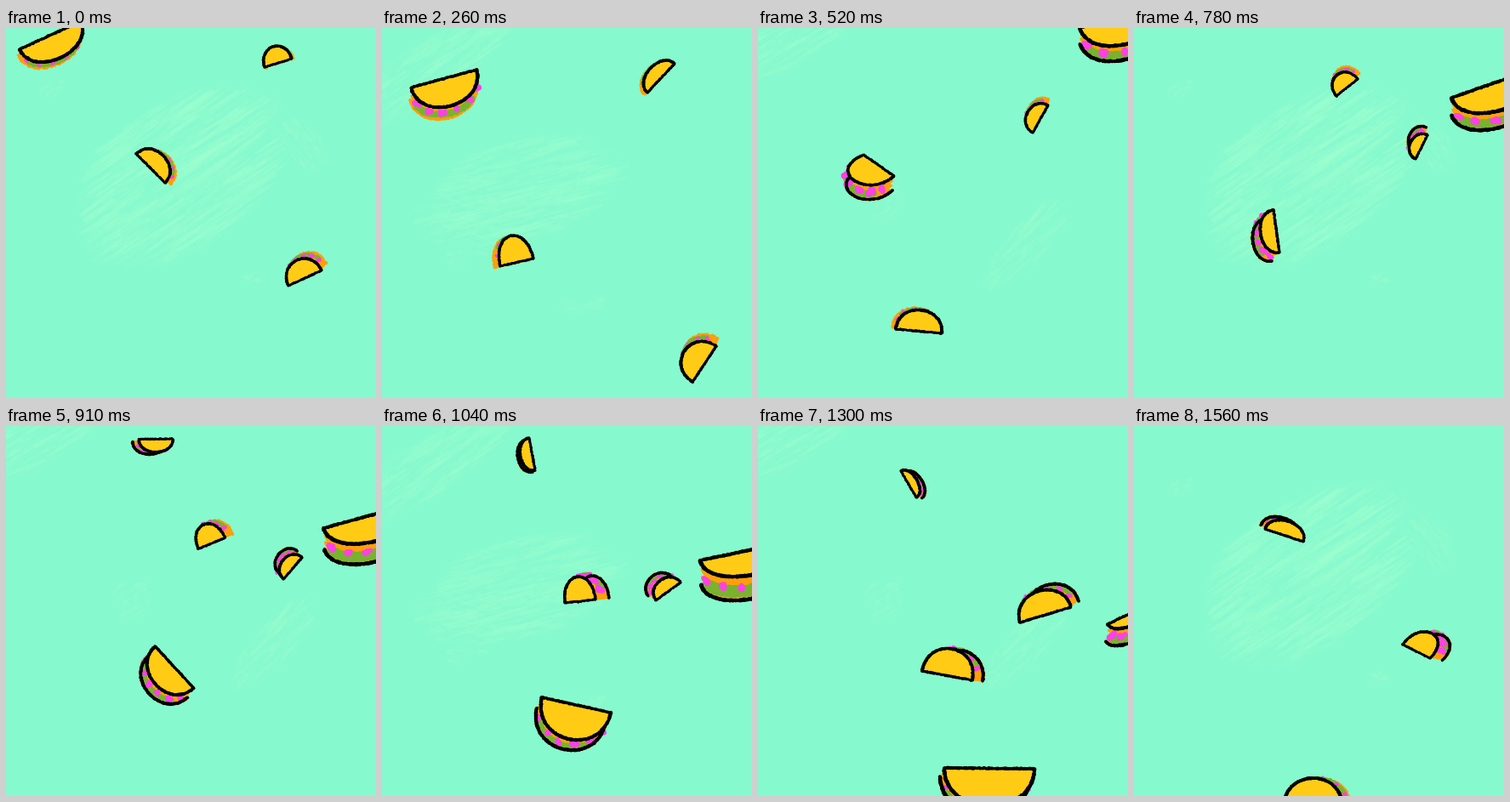
Animation, 435 px wide and 435 px high, one loop 1690 ms. Source, as an HTML page with a canvas:

```html
<!DOCTYPE html>
<html lang="en">
<head>
<meta charset="utf-8">
<title>Falling tacos</title>
<style>
  html, body { margin: 0; width: 100%; height: 100%; overflow: hidden; background: #86f9ce; }
  canvas { display: block; width: 435px; height: 435px; }
</style>
</head>
<body>
<canvas id="stage" width="435" height="435"></canvas>
<script>
const ctx = document.getElementById('stage').getContext('2d');
const SIZE = 435, STEP = 130, STEPS = 13;
const COLOR = { shell: '#ffcb14', back: '#ff9f0a', salad: '#79b330', salsa: '#ff40e6', ink: '#000' };

// A pose every second step: tip P (x, y), tip Q (x, y), bulge, back shell offset (x, y), lean.
// The bulge lies to the left when walking from P to Q.
const tumbler = [
  [304, 46, 336, 36, 20, 2, 1],
  [312, 76, 344, 42, 17, -3, 2],
  [323, 123, 341, 91, 17, 2, -6],
  [331, 154, 345, 126, 14, -1, -9],
  [322, 205, 351, 184, 16, -9, -5],
  [308, 231, 368, 213, 29, 9, -7],
  [316, 257, 348, 273, 27, 14, 3, .35]
];
const tumblerEnd = [
  [332, 303, 371, 285, 23, 6, -7],
  [365, 416, 393, 374, 28, 3, -8]
];
const drifter = [
  [180, 52, 173, 14, 14, -3, 2],
  [168, 53, 186, 84, 11, 6, 1],
  [154, 121, 199, 136, 17, -5, -4]
];
const drifterEnd = [
  [153, 148, 187, 182, 21, 6, 2],
  [139, 280, 178, 271, 32, -6, 3],
  [162, 354, 216, 359, 25, -4, -2]
];
const diver = [
  [88, -8, 16, 25, 29, -2, 7],
  [111, 49, 34, 70, 33, -1, 14],
  [160, 174, 124, 149, 31, -2, 17, .6],
  [171, 264, 164, 214, 19, -9, 10],
  [269, 337, 188, 319, 41, -6, 12],
  [325, 403, 219, 402, 44, -5, 9]
];
const giant = [
  [480, -35, 378, 0, 36, 0, 18],
  [480, 45, 373, 82, 33, 0, 20],
  [490, 134, 374, 158, 29, 1, 28],
  [480, 200, 411, 233, 15, -2, 20]
];
const grower = [
  [238, 80, 263, 60, 19, 2, -6],
  [215, 208, 251, 204, 29, 16, -1],
  [193, 288, 252, 299, 32, 12, 2],
  [176, 448, 245, 448, 34, 10, 1]
];

// base: step of the first pose; from..to: visible steps; ink: steps with an outlined back shell.
const tacos = [
  { poses: tumbler, base: 0, from: 0, to: 12, ink: [6, 12] },
  { poses: tumblerEnd, base: 0, from: 0, to: 3, ink: [] },
  { poses: drifter, base: 8, from: 7, to: 12, ink: [7, 12] },
  { poses: drifterEnd, base: 0, from: 0, to: 5, ink: [] },
  { poses: diver, base: 0, from: 0, to: 11, ink: [4, 11] },
  { poses: giant, base: 4, from: 3, to: 11, ink: [3, 11] },
  { poses: grower, base: 6, from: 5, to: 12, ink: [8, 11] }
];

// Brush patches: x, y, radius x, radius y, tilt.
const backdrops = [
  { density: .075, patches: [[205, 175, 125, 85, -.6], [55, 72, 15, 9, -.5], [350, 140, 35, 22, .9], [290, 294, 12, 6, 0]] },
  { density: .06, patches: [[150, 205, 24, 24, -.6], [315, 255, 65, 24, -.8], [30, 15, 100, 30, -.5]] },
  { density: .05, patches: [[165, 190, 115, 58, -.25], [100, 225, 38, 55, .3], [60, 45, 110, 32, -.6], [232, 327, 30, 8, -.2]] }
];

let seed = 1;
function rnd() {
  seed = (seed * 1664525 + 1013904223) >>> 0;
  return seed / 4294967296;
}
const jitter = r => (rnd() - .5) * 2 * r;
const mix = (a, b, t) => a + (b - a) * t;

function drawBackdrop(id) {
  const { density, patches } = backdrops[id];
  seed = 70 + id;
  ctx.fillStyle = '#86f9ce';
  ctx.fillRect(0, 0, SIZE, SIZE);
  ctx.lineCap = 'round';
  ctx.strokeStyle = 'rgba(158,255,207,.17)';
  for (const [x, y, rx, ry, tilt] of patches) {
    ctx.save();
    ctx.translate(x, y);
    ctx.rotate(tilt);
    for (let i = 0; i < 15 + rx * ry * density; i++) {
      const a = rnd() * Math.PI * 2, r = Math.sqrt(rnd());
      const u = Math.cos(a) * r * rx, v = Math.sin(a) * r * ry, len = rx * (.06 + rnd() * .14);
      ctx.lineWidth = 1 + rnd() * 4;
      ctx.beginPath();
      ctx.moveTo(u - len, v + jitter(1));
      ctx.lineTo(u + len, v + jitter(1));
      ctx.stroke();
    }
    ctx.restore();
  }
}

// Blends neighbouring poses; steps outside the list continue the nearest motion.
function poseAt({ poses, base, ink }, step) {
  const pos = (step - base) / 2;
  const i = Math.max(0, Math.min(poses.length - 2, Math.floor(pos)));
  const a = poses[i], b = poses[i + 1], t = pos - i;
  const at = n => mix(a[n] || 0, b[n] || 0, t);
  const angle = r => Math.atan2(r[3] - r[1], r[2] - r[0]);
  const span = r => Math.hypot(r[2] - r[0], r[3] - r[1]);
  const turn = angle(b) - angle(a);
  const dir = angle(a) + t * Math.atan2(Math.sin(turn), Math.cos(turn));
  const len = mix(span(a), span(b), t);
  const cx = (at(0) + at(2)) / 2, cy = (at(1) + at(3)) / 2;
  const dx = Math.cos(dir) * len, dy = Math.sin(dir) * len;
  return {
    p: [cx - dx / 2, cy - dy / 2], q: [cx + dx / 2, cy + dy / 2],
    d: [dx, dy], len, bulge: at(4), off: [at(5), at(6)], lean: at(7),
    outlined: step >= ink[0] && step <= ink[1]
  };
}

function arcOf({ p, q, d, len, bulge, lean }) {
  const k = bulge * 4 / 3 / len, normal = [d[1] * k, -d[0] * k];
  const pts = [];
  for (let i = 0; i <= 40; i++) {
    const t = i / 40, s = 1 - t;
    pts.push([0, 1].map(n => {
      const c = p[n] + normal[n] + d[n] * lean * .4;
      const e = q[n] + normal[n] + d[n] * lean;
      return s * s * s * p[n] + 3 * s * s * t * c + 3 * s * t * t * e + t * t * t * q[n];
    }));
  }
  return pts;
}

const shift = (pts, [x, y], k) => pts.map(p => [p[0] + x * k, p[1] + y * k]);

function fillShape(pts, color) {
  ctx.fillStyle = color;
  ctx.beginPath();
  pts.forEach(p => ctx.lineTo(p[0], p[1]));
  ctx.fill();
}

function dab(x, y, r) {
  ctx.beginPath();
  ctx.arc(x, y, r, 0, Math.PI * 2);
  ctx.fill();
}

// Dry-brush line: overlapping dabs of uneven size.
function brush(pts, r, color, rough = .35) {
  ctx.fillStyle = color;
  for (let i = 1; i < pts.length; i++) {
    const [x0, y0] = pts[i - 1], [x1, y1] = pts[i];
    const n = Math.max(1, Math.ceil(Math.hypot(x1 - x0, y1 - y0) / .9));
    for (let j = 0; j < n; j++) {
      dab(mix(x0, x1, j / n) + jitter(rough), mix(y0, y1, j / n) + jitter(rough), r * (.8 + rnd() * .35));
    }
  }
}

function drawTaco(pose) {
  const front = arcOf(pose), { off, len, outlined } = pose;
  const depth = Math.hypot(...off), ink = 1.4 + len * .007;
  const back = shift(front, off, 1);

  for (let k = 1; k <= 3; k++) fillShape(shift(front, off, k / 3), COLOR.back);
  brush(back, 1.5, COLOR.back, .9);
  brush(shift(front, off, .62).slice(9, 36), Math.max(1.5, depth * .23), COLOR.salad, .9);
  if (depth > 4) {
    const row = shift(front, off, .45), r = Math.min(4, Math.max(1.8, depth * .24));
    ctx.fillStyle = COLOR.salsa;
    for (let i = 5; i < 38; i += 6) {
      for (let j = 0; j < 5; j++) dab(row[i][0] + jitter(r), row[i][1] + jitter(r * .7), r * (.6 + rnd() * .4));
    }
  }
  if (outlined) brush(back, ink, COLOR.ink);

  fillShape(front, COLOR.shell);
  brush(front, ink, COLOR.ink);
  brush([pose.q, pose.p], ink * .9, COLOR.ink);
}

function drawStep(step) {
  drawBackdrop(step % 3);
  tacos.forEach((taco, i) => {
    if (step < taco.from || step > taco.to) return;
    seed = 1000 + step * 97 + i * 31;
    drawTaco(poseAt(taco, step));
  });
}

let shown = -1;
function tick() {
  const step = Math.floor(performance.now() / STEP) % STEPS;
  if (step !== shown) drawStep(shown = step);
  requestAnimationFrame(tick);
}
tick();
</script>
</body>
</html>
```
